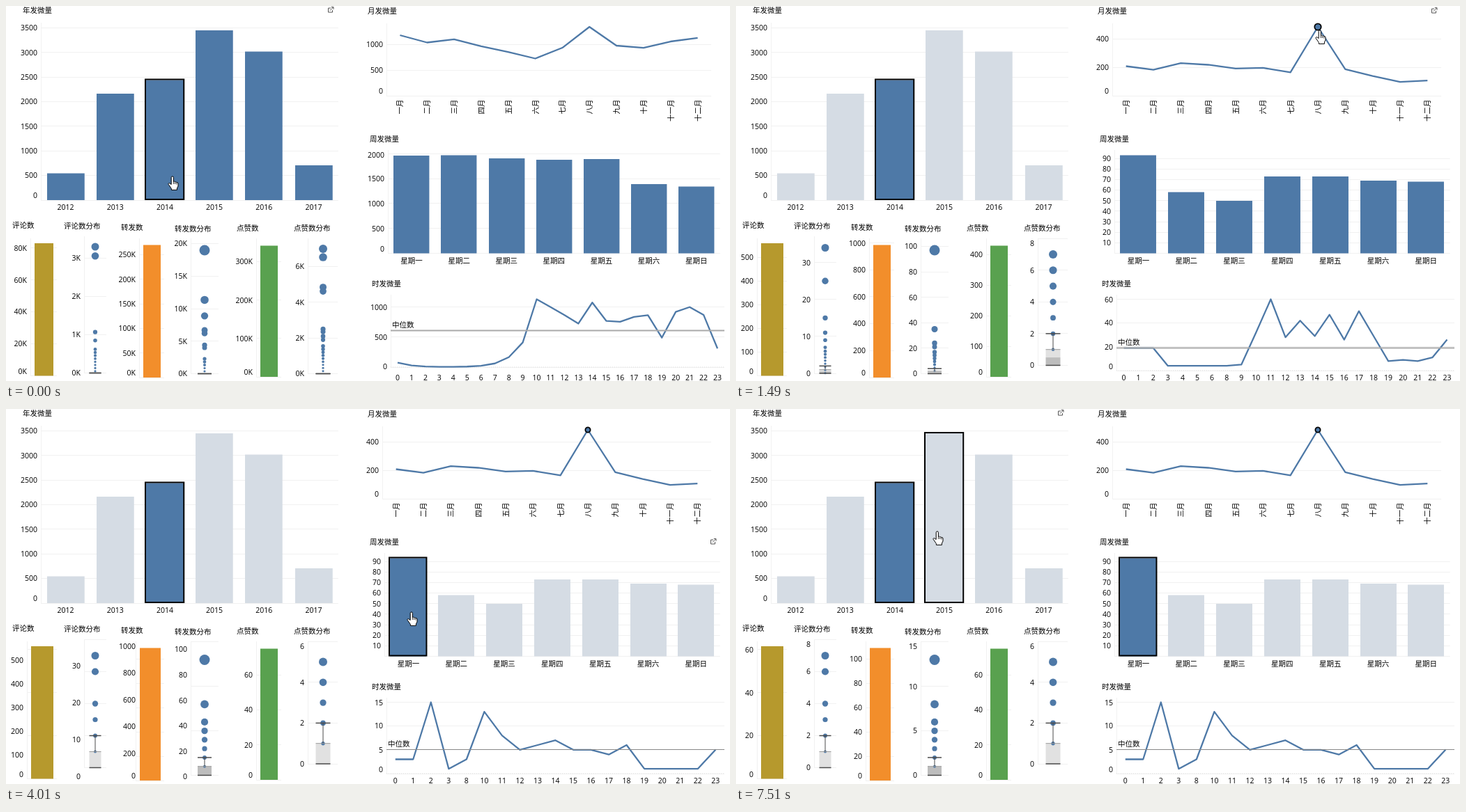
An HTML page that plays this animation: 1039x539 px, repeating every 8 s.

```html
<!DOCTYPE html>
<html lang="zh">
<head>
<meta charset="utf-8">
<style>
html, body { margin: 0; width: 100%; height: 100%; overflow: hidden; background: #fff }
svg { display: block; width: 1039px; height: 539px }
text { font: 10.5px "Open Sans", "Noto Sans", "Noto Sans CJK SC", "Noto Sans CJK", sans-serif; fill: #000 }
</style>
</head>
<body>
<svg id="stage" viewBox="0 0 1039 539"></svg>
<script>
const BLUE = '#4e79a7', FADED = '#d5dce4', GRID = '#f1f1f1', DARK = '#4a4a4a';
const LOOP = 8000;

// start, data level, level shown on the slower axes, active panel, cursor, x, y
const scenes = [
  [0, 0, 0, 'year', 'hand', 239, 245],
  [500, 1, 0, 'year', 'hand', 239, 245],
  [990, 1, 1, 'month', 'hand', 838, 35],
  [1490, 2, 2, 'month', 'hand', 838, 35],
  [2490, 2, 2, 'week', 'arrow', 647, 245],
  [3010, 2, 2, 'week', 'hand', 582, 292],
  [3510, 2, 2, 'week', 'hand', 582, 292],
  [4010, 3, 2, 'week', 'hand', 582, 292],
  [4510, 3, 3, 'week', 'arrow', 593, 357],
  [5010, 3, 3, 'hour', 'arrow', 902, 509],
  [5490, 3, 3, 'hour', 'hand', 1015, 497],
  [6010, 3, 3, 'year', 'hand', 238, 245],
  [6510, 3, 3, 'week', 'hand', 582, 269],
  [6990, 3, 3, 'year', 'hand', 289, 176],
  [7510, 3, 3, 'year', 'hand', 289, 176]
];

const icons = { year: [466, 5], month: [1002, 6], week: [1015, 190], hour: [1021, 397] };
const cursors = {
  hand: 'M-1.8 11.5V1.5a1.6 1.6 0 0 1 3.2 0V7.5q1.3-.9 2.2.5 1.4-.8 2.2.6 1.9-.5 2.2 1.4V14l-1.6 3v2.4H-1.6V17.5L-4 14-5.8 11.4c-.8-1.3.9-2.3 1.9-1.4z',
  arrow: 'M.5 .5V15.5L4 12.3 6.3 18 8.6 17 6.3 11.5H10.5z'
};

const range = n => [...Array(n).keys()];
const down = n => range(n).map(i => n - i);

// Posts per year, month, weekday and hour
const years = [545, 2165, 2440, 3450, 3020, 707];
const months = [
  [1176, 1034, 1095, 960, 851, 723, 932, 1338, 973, 932, 1054, 1122],
  [209, 184, 231, 219, 192, 197, 165, 487, 187, 140, 98, 108]
];
const weeks = [
  [1960, 1967, 1905, 1882, 1890, 1387, 1338],
  [387, 362, 335, 384, 407, 289, 261],
  [93, 58, 50, 73, 73, 69, 68]
];
const days = [
  [410, 1130, 1000, 865, 725, 1075, 770, 755, 835, 865, 490, 920, 1000, 870, 310],
  [66, 291, 281, 116, 85, 260, 113, 134, 128, 200, 34, 210, 197, 184, 36],
  [5, 32, 60, 28, 42, 29, 47, 26, 50, 29, 8, 9, 8, 11, 26]
];
const mondays = [3, 3, 15, 1, 3, 13, 8, 5, 6, 7, 5, 5, 4, 6, 1, 1, 1, 1, 5];
const night = (level, h) => level ? (h < 3 ? 19 : 4) : 75 * Math.exp(-h) + 165 * Math.exp(h - 8);
const hourNames = level => range(24).filter(h => !level || h != 7 && (level < 3 || h < 4 || h == 8 || h > 9));
const hourValues = level => level == 3 ? mondays :
  hourNames(level).map(h => h < 9 ? night(level, h) : days[level][h - 9]);

// Totals: [value, right edge of the labels, unit] per level
const totals = [
  { title: ['评论数', 9, 315], color: '#b6992d', top: 341, base: 531.5, end: 68,
    levels: [[83, 30, 'K'], [16, 25, 'K'], [560, 25], [61.6, 25]] },
  { title: ['转发数', 165, 318], color: '#f28e2b', top: 343.5, base: 534, end: 222,
    levels: [[270, 186, 'K'], [70, 181, 'K'], [985, 186], [109, 181]] },
  { title: ['点赞数', 331, 319], color: '#59a14f', top: 344.5, base: 533, end: 390,
    levels: [[342, 354, 'K'], [75, 354, 'K'], [430, 354], [75, 354]] }
];

// Spreads: outlying values, start of the dense tail, box [whisker, top, middle]
const spreads = [
  { title: ['评论数分布', 83, 316], x: 128, right: 107, end: 144, head: 331, r: 5.5, half: 8.5, levels: [
    { unit: 'K', values: [3.3, 3.06, 1.07, .85], tail: .62, box: [0, 0, 0], top: 346, base: 527.5 },
    { values: [748, 373, 240, 200], tail: 165, box: [14, 10, 7], top: 346, base: 527.5 },
    { values: [34, 25, 15, 11, 9, 7], tail: 6, box: [2, 1, .5], top: 347.5, base: 528 },
    { values: [7, 6, 4, 3, 2, 1], box: [2, 1, 0], top: 354.5, base: 515.5 }] },
  { title: ['转发数分布', 242, 320], x: 285, right: 260, end: 305, head: 334, r: 7.5, half: 10, levels: [
    { unit: 'K', values: [19, 11.35, 8.9, 6.7, 6.2, 4.4, 4], tail: 2.3, box: [0, 0, 0], top: 351, base: 528.5 },
    { unit: 'K', values: [3.8, 3.68, 1.25, 1.08, 1, .83, .72], tail: .52, box: [.04, .03, .03], top: 351, base: 528.5 },
    { values: [97, 35, 24, 21], tail: 17, box: [4, 2, 1.5], top: 351, base: 528.5 },
    { values: [13, 8, ...down(6)], box: [2, 1, 1], top: 360.5, base: 526.5 }] },
  { title: ['点赞数分布', 413, 319], x: 455, right: 428, end: 476, head: 334, r: 6, half: 10.5, levels: [
    { unit: 'K', values: [7, 6.53, 4.85, 4.62, 2.5, 2.35, 2.1, 1.9], tail: 1.55, box: [0, 0, 0], top: 349, base: 528.5 },
    { unit: 'K', values: [3.1, 2.43, .87, .75, .65], tail: .55, box: [.17, .1, .05], top: 350, base: 528 },
    { values: down(7), box: [2, 1, .5], top: 357, base: 516.5 },
    { values: down(5), box: [2, 1, 0], top: 363.5, base: 510 }] }
];

const text = (s, x, y, anchor = 'start') => `<text x="${x}" y="${y + 3.8}" text-anchor="${anchor}">${s}</text>`;
const rect = (x0, y0, x1, y1, fill, more = '') =>
  `<rect x="${x0}" y="${y0}" width="${x1 - x0}" height="${Math.max(0, y1 - y0)}" fill="${fill}" ${more}/>`;
const line = (x0, y0, x1, y1, color = GRID, w = 1, more = '') =>
  `<path d="M${x0} ${y0}L${x1} ${y1}" stroke="${color}" stroke-width="${w}" ${more}/>`;
const dot = (x, y, r, more = '') => `<circle cx="${x}" cy="${y}" r="${r}" fill="${BLUE}" ${more}/>`;
const curve = pts => `<polyline points="${pts.join(' ')}" fill="none" stroke="${BLUE}" stroke-width="2.3" stroke-linejoin="round"/>`;

function niceStep(max, limit) {
  for (let power = 1; ; power *= 10)
    for (const m of [1, 2, 5]) if (max / (m * power) <= limit) return m * power;
}

// An axis maps 0 to base and max to top; ticks reach up to head, the plot runs from right + 5 to end.
function makeAxis(spec) {
  const a = { unit: '', low: spec.base - 6.6, ...spec };
  a.left = a.right + 5;
  a.y = v => a.base - (a.base - a.top) * v / a.max;
  const step = niceStep(a.max, a.limit);
  a.ticks = [];
  for (let v = step; a.y(v) >= a.head; v += step) a.ticks.push(v);
  if (a.base - a.y(step) > 20) a.ticks.unshift(0);
  a.band = n => {
    const pitch = (a.end - a.left) / n;
    return { pitch, at: i => a.left + (i + .5) * pitch };
  };
  return a;
}
const snap = y => Math.floor(y) + .5;
const frame = a => [...a.ticks, 0].map(v => line(a.left, snap(a.y(v)), a.end, snap(a.y(v)))).join('') +
  line(snap(a.left), a.head, snap(a.left), a.base);
const labels = a => a.ticks.map(v =>
  text(v + a.unit, a.right, Math.min(a.low, Math.max(a.head + 7, a.y(v))), 'end')).join('');

// weight(i) is the outline of a bar: 0 none, 1 hovered, 2 selected
function bars(a, values, fill, name, nameY, weight) {
  const { pitch, at } = a.band(values.length), w = pitch * .755;
  return frame(a) + labels(a) + values.map((v, i) => {
    const x = Math.round(at(i) - w / 2), top = Math.round(a.y(v) * 2) / 2, k = weight(i), d = k / 2;
    return rect(x, top, x + w, a.base, fill(i)) + text(name(i), at(i), nameY, 'middle') +
      (k ? rect(x - 2 + d, top - 2 + d, x + w + 1.5 - d, a.base - d, 'none', `stroke="#000" stroke-width="${k}"`) : '');
  }).join('');
}

function yearChart(t, level) {
  const a = makeAxis({ max: 3450, top: 35, base: 279, head: 24, limit: 7, right: 45, end: 477 });
  return bars(a, years, i => level && i != 2 ? FADED : BLUE, i => 2012 + i, 289,
    i => i == 2 || i == 3 && t >= 7510 ? 2 : i == 3 && t >= 6990 ? 1 : 0);
}

const monthAxis = level => makeAxis({ max: Math.max(...months[Math.min(level, 1)]),
  top: 30, base: 129, head: 25, limit: 3, right: level ? 535 : 541, end: 1012 });

function monthChart(t, level, shown) {
  const a = monthAxis(level), { at } = a.band(12);
  let out = frame(a) + labels(monthAxis(shown));
  '一 二 三 四 五 六 七 八 九 十 十一 十二'.split(' ').forEach((s, i) => {
    out += `<text transform="translate(${at(i) + 4} 134.5) rotate(-90)" text-anchor="end">${s}月</text>`;
  });
  out += curve(months[Math.min(level, 1)].map((v, i) => [at(i), a.y(v)]));
  if (t == 990) out += dot(at(7), 30, 3);
  if (t >= 1490) out += dot(at(7), 30, t == 1490 ? 4.7 : 3.6, 'stroke="#000" stroke-width="1.8"');
  return out;
}

function weekChart(t, level) {
  const values = weeks[Math.min(level, 2)];
  const a = makeAxis({ max: Math.max(...values), top: 214.7, base: 355.5, head: 207,
    limit: level > 1 ? 10 : 5, right: level ? 538 : 543, end: 1024.7 });
  return bars(a, values, i => level == 3 && i ? FADED : BLUE, i => '星期' + '一二三四五六日'[i], 366,
    i => i ? 0 : t >= 3510 ? 2 : t >= 3010 ? 1 : 0);
}

function median(list) {
  const s = [...list].sort((p, q) => p - q), n = s.length;
  return (s[n >> 1] + s[(n - 1) >> 1]) / 2;
}

function hourChart(t, level) {
  const values = hourValues(level), n = values.length;
  const a = makeAxis({ max: Math.max(...values), top: 421.5, base: level > 1 ? 524 : 519, head: 415, low: 518,
    limit: 3, right: level ? 541 : 547, end: 1031 });
  const { at } = a.band(n), mid = snap(a.y(median(values)));
  return frame(a) + line(a.left, a.base, a.end, a.base, '#ddd', 1, 'stroke-dasharray="1 2"') + labels(a) +
    hourNames(level).map((h, i) => text(h, at(i), 534, 'middle')).join('') +
    curve(values.map((v, i) => [at(i), a.y(v)])) +
    line(a.left, mid, a.end, mid, level % 2 ? '#888' : '#aaa', level % 2 ? 1 : 1.8) +
    text('中位数', a.left + 2, mid - 8.5) +
    (t == 5490 ? dot(at(n - 1), a.y(values[n - 1]), 3) : '');
}

function total(p, level, shown) {
  const axis = ([max, right, unit = '']) => makeAxis({ max, right, unit, top: p.top, base: p.base, head: 334, limit: 6, end: p.end + 5 });
  const a = axis(p.levels[level]);
  return frame(a) + rect(a.right + 11, p.top, p.end, p.base, p.color) + labels(axis(p.levels[shown]));
}

function spread(p, level, shown) {
  const axis = ({ values, top, base, unit = '' }) => makeAxis({ max: values[0], top, base, unit,
    head: p.head, low: 528.5, limit: 4.9, right: p.right, end: p.end });
  const { values, tail, box } = p.levels[level], a = axis(p.levels[level]);
  const [whisker, top, middle] = box.map(a.y), x0 = p.x - p.half, x1 = p.x + p.half;
  const ys = values.map(a.y);
  if (tail) for (let y = a.y(tail); y < a.base; y += 4.5) ys.push(y);
  return frame(a) + labels(axis(p.levels[shown])) +
    rect(x0, top, x1, middle, '#e1e1e1') + rect(x0, middle, x1, a.base, '#bdbdbd') +
    ys.map(y => dot(p.x, y, Math.max(1.6, p.r * Math.sqrt((a.base - y) / (a.base - a.top))))).join('') +
    line(p.x, whisker, p.x, top, DARK) + line(x0, top, x1, top, '#999') +
    line(x0, whisker, x1, whisker, DARK, 1.5) + line(x0, a.base, x1, a.base, DARK, 1.5);
}

const icon = (x, y) => `<path transform="translate(${x} ${y})" d="M0-2H-3.5V4H2.5V1M-1 1.5L3.5-3M.8-3.5H4V-.3" fill="none" stroke="#555"/>`;

function pointer(kind, x, y) {
  const creases = kind == 'hand' ? '<path d="M1.4 7.5V11M3.6 8.5V11M5.8 9V11.5" stroke="#000" stroke-width=".8"/>' : '';
  return `<g transform="translate(${x} ${y})"><path d="${cursors[kind]}" fill="#fff" stroke="#000" stroke-linejoin="round"/>${creases}</g>`;
}

function draw([t, level, shown, panel, ...cursor]) {
  // The rightmost column keeps up with the last filter.
  const lower = i => i == 2 && level == 3 ? 3 : shown;
  stage.innerHTML = text('年发微量', 24, 6) + text('月发微量', 519, 7) + text('周发微量', 522, 191) + text('时发微量', 525, 399) +
    yearChart(t, level) + monthChart(t, level, shown) + weekChart(t, level) + hourChart(t, level) +
    totals.map((p, i) => text(...p.title) + total(p, level, lower(i))).join('') +
    spreads.map((p, i) => text(...p.title) + spread(p, level, lower(i))).join('') +
    icon(...icons[panel]) + pointer(...cursor);
}

const stage = document.getElementById('stage');
let current;
function tick() {
  const t = performance.now() % LOOP;
  const scene = scenes.findLast(s => s[0] <= t);
  if (scene != current) draw(current = scene);
  requestAnimationFrame(tick);
}
tick();
</script>
</body>
</html>
```
